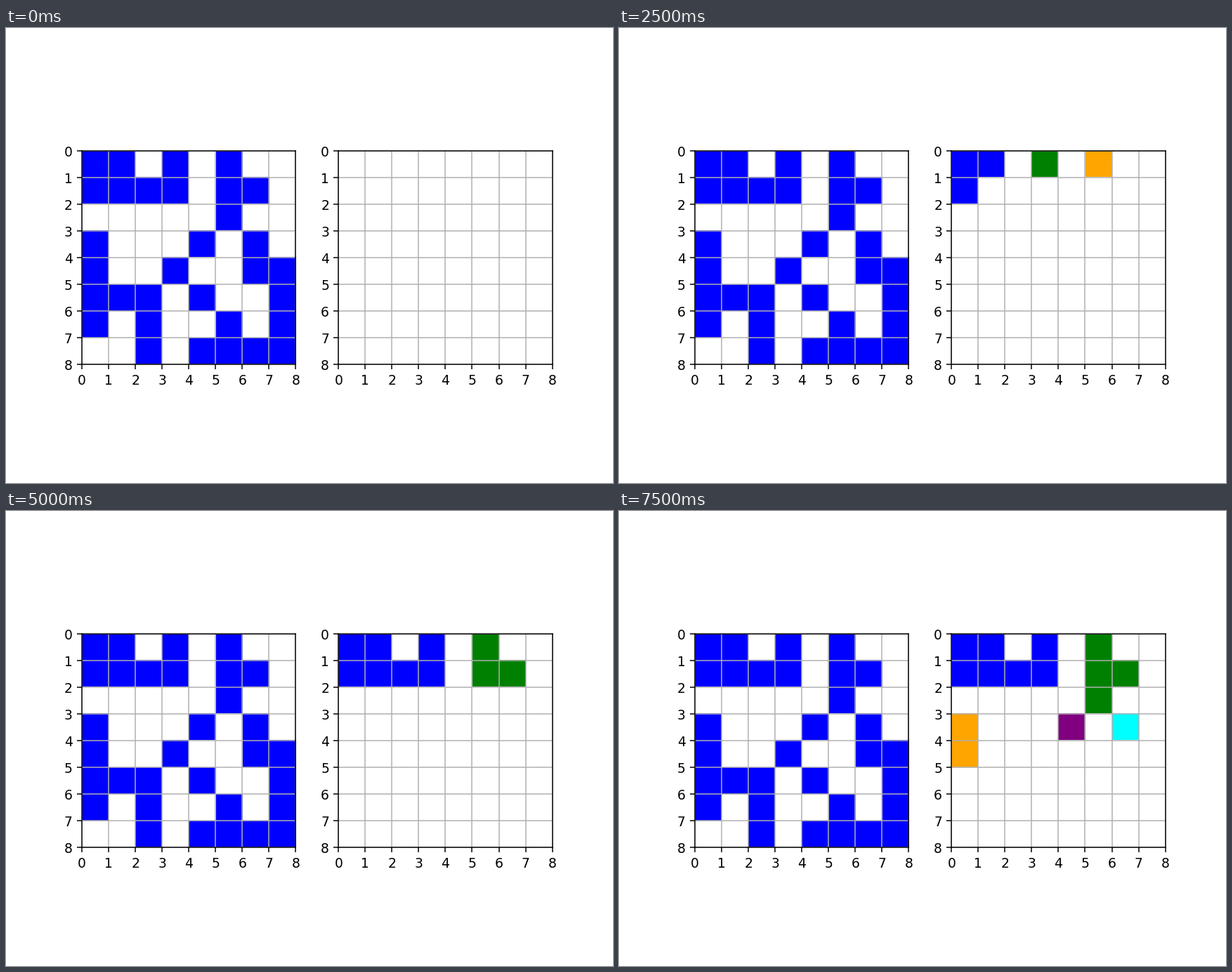
These frames come from a looping animation (864x648 px, 8000 ms). A matplotlib script:

```python
import numpy as np
import matplotlib.pyplot as plt
from matplotlib.animation import FuncAnimation
from matplotlib.colors import to_rgb

# Cluster labelling of an occupied lattice, one cell per step.
ROWS = [
    "##.#.#..",
    "####.##.",
    ".....#..",
    "#...#.#.",
    "#..#..##",
    "###.#..#",
    "#.#..#.#",
    "..#.####",
]
STEPS = 16
PALETTE = np.array([to_rgb(c) for c in
                    ("white", "blue", "green", "orange", "purple", "cyan")])

lattice = np.array([[ch == "#" for ch in row] for row in ROWS], dtype=int)
size = len(lattice)
cells = np.argwhere(lattice)


def label_cells(count):
    """Label the first `count` occupied cells, keeping labels consecutive."""
    labels = np.zeros_like(lattice)
    for r, c in cells[:count]:
        above = labels[r - 1, c] if r else 0
        left = labels[r, c - 1] if c else 0
        if above and left and above != left:
            keep, drop = sorted((above, left))
            labels[labels == drop] = keep
            labels[labels > drop] -= 1
            labels[r, c] = keep
        else:
            labels[r, c] = max(above, left) or labels.max() + 1
    return labels


def draw_grid(ax, labels):
    image = ax.imshow(PALETTE[labels], extent=(0, size, size, 0),
                      interpolation="nearest")
    ax.set_xticks(range(size + 1))
    ax.set_yticks(range(size + 1))
    ax.grid(True)
    return image


fig, (ax_input, ax_labels) = plt.subplots(1, 2, figsize=(6.4, 4.8), dpi=135)
draw_grid(ax_input, lattice)
label_image = draw_grid(ax_labels, label_cells(0))


def update(step):
    label_image.set_data(PALETTE[label_cells(step)])
    return [label_image]


anim = FuncAnimation(fig, update, frames=STEPS, interval=500,
                     repeat=True, repeat_delay=0, blit=False)
plt.show()
```
